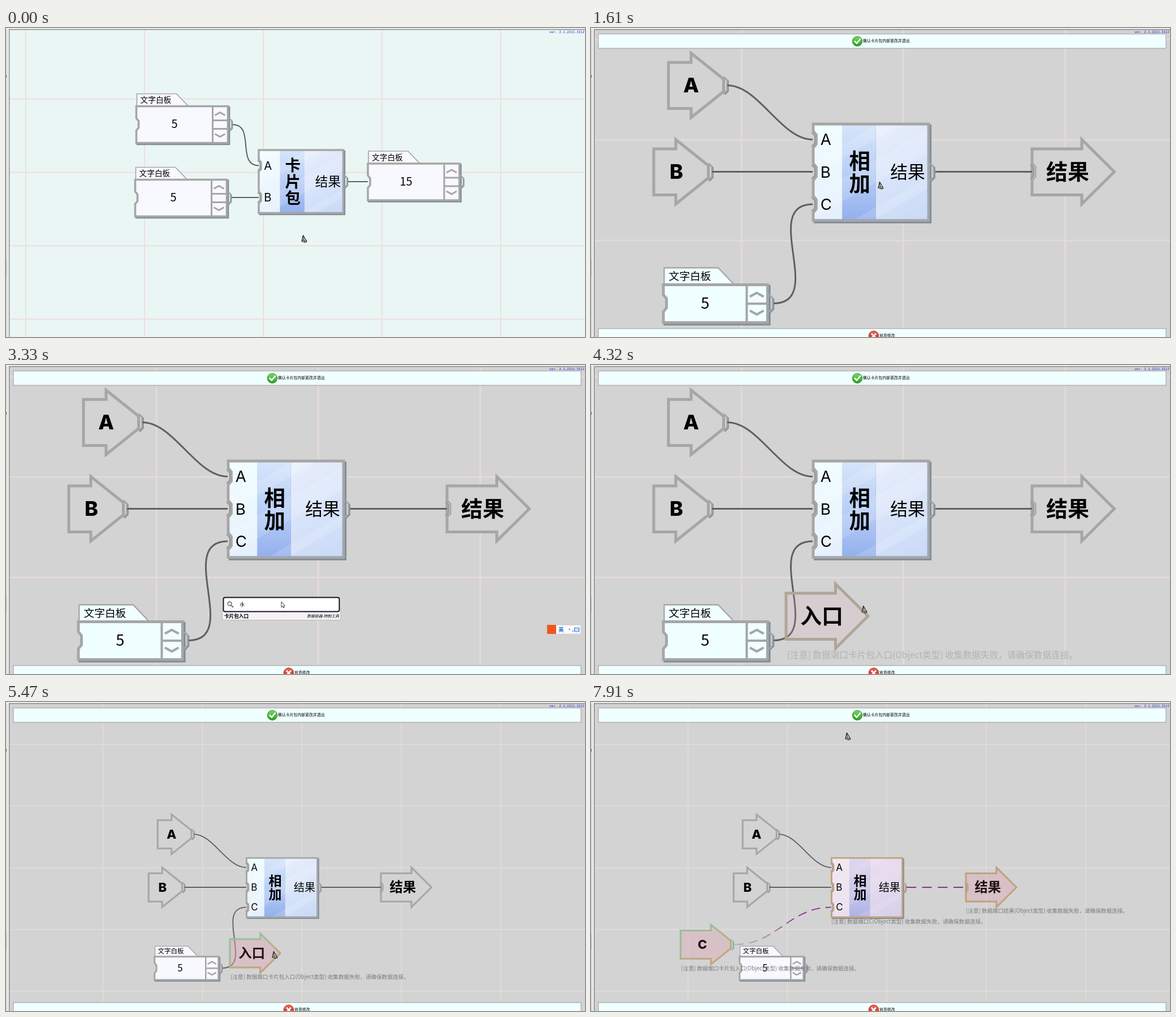
Animation of 1024x547 px, one loop 8 s. Source, as an HTML page with a canvas:

```html
<!DOCTYPE html>
<html lang="zh">
<head>
<meta charset="utf-8">
<title>卡片包</title>
<style>
html, body { margin: 0; width: 100%; height: 100%; overflow: hidden; background: #f0f0f0; }
canvas { display: block; }
</style>
</head>
<body>
<canvas id="stage" width="1024" height="547"></canvas>
<script>
const ctx = document.getElementById('stage').getContext('2d');
const LOOP = 8000;
const SANS = '"Noto Sans CJK SC", "Noto Sans CJK", "Noto Sans", sans-serif';
const LATIN = 'Inter, "Noto Sans CJK SC", sans-serif';
const MONO = '"DejaVu Sans Mono", "Noto Sans Mono", monospace';
const GREY = '#a6a6a6', SHADOW = '#7d8b99', WIRE = '#606060', PURPLE = '#8b3090';
const EDGE = [166, 166, 166], TAN = [192, 162, 126], GREEN = [140, 200, 170];
const UNIT = 1.365;               // size of cards inside the pack
const ZOOM = 0.614, PIVOT = [477, 445];

const lerp = (a, b, p) => a + (b - a) * p;
const clamp = v => Math.max(0, Math.min(1, v));
const mix = (a, b, p) => `rgb(${a.map((v, i) => Math.round(lerp(v, b[i], p)))})`;

// Number of changes seen so far, out of n spread evenly over start..end.
function steps(t, start, end, n) {
  if (t < start) return 0;
  return Math.min(n, Math.floor((t - start) / (end - start) * (n - 1) + 0.02) + 1);
}

function text(s, x, y, size, o = {}) {
  ctx.font = `${o.style || 'normal'} ${o.weight || 400} ${size}px ${o.font || SANS}`;
  ctx.textAlign = o.align || 'left';
  ctx.textBaseline = 'alphabetic';
  ctx.fillStyle = o.color || '#000';
  ctx.fillText(s, x, y + size * 0.37);
}

function poly(points, open) {
  ctx.beginPath();
  points.forEach(([x, y]) => ctx.lineTo(x, y));
  if (!open) ctx.closePath();
}

function paint(fill, stroke, width) {
  if (fill) { ctx.fillStyle = fill; ctx.fill(); }
  if (stroke) { ctx.strokeStyle = stroke; ctx.lineWidth = width; ctx.stroke(); }
}

function gradient(x0, y0, x1, y1, ...colors) {
  const g = ctx.createLinearGradient(x0, y0, x1, y1);
  colors.forEach((c, i) => g.addColorStop(i / (colors.length - 1), c));
  return g;
}

function local(x, y, k, draw) {
  ctx.save();
  ctx.translate(x, y);
  ctx.scale(k, k);
  draw();
  ctx.restore();
}

// Outline of a card with a notch in the left edge at each input.
function bodyPath(w, h, inputs) {
  const points = [[0, 0], [w, 0], [w, h], [0, h]];
  for (const y of [...inputs].reverse())
    points.push([0, y + 11], [4, y + 6], [4, y - 6], [0, y - 11]);
  poly(points);
}

function plug(x, y, color, width) {
  poly([[x, y - 11], [x + 4.5, y - 6.5], [x + 4.5, y + 6.5], [x, y + 11]], true);
  paint(null, color, width);
}

function socket(x, y) {
  poly([[x - 4, y - 9], [x, y - 5], [x, y + 5], [x - 4, y + 9]], true);
  paint(null, '#9b9b9b', 1.8);
}

function outPort(x, y, color = GREY) {
  plug(x + 1.4, y + 1, SHADOW, 1.6);
  plug(x, y, color, 2);
}

function chevron(x, y, dir) {
  poly([[x - 9, y + 3 * dir], [x, y - 2 * dir], [x + 9, y + 3 * dir]], true);
  paint(null, GREY, 3);
}

function board(x, y, w, h, k, value, fill, rows) {
  local(x, y, k, () => {
    const mid = h / 2 - 0.5, div = w - 27;
    poly([[1, 0], [1, -22], [71, -22], [92, 0]]);
    paint(fill, GREY, 1.7);
    text('文字白板', 7, -11.5, 13.7);
    ctx.save();
    ctx.translate(2, 2);
    bodyPath(w, h, [mid]);
    paint(SHADOW, SHADOW, 3.6);
    ctx.restore();
    outPort(w + 2, mid);
    bodyPath(w, h, [mid]);
    paint(fill, GREY, 3.6);
    poly([[div, 0], [div, h]], true);
    paint(null, GREY, 3);
    for (const row of rows) {
      poly([[div, row], [w, row]], true);
      paint(null, GREY, 3);
    }
    const edge = rows.length > 1 ? 13 : 12.5;
    chevron(w - 14, edge, 1);
    chevron(w - 14, h - edge, -1);
    text(value, div / 2, mid - 0.5, 20, { align: 'center' });
  });
}

function panels(h, [a, b, c, d]) {
  ctx.fillStyle = gradient(0, 0, 38, h, a, b);
  ctx.fillRect(0, 0, 38, h);
  ctx.fillStyle = gradient(81, 0, 150, h, c, d);
  ctx.fillRect(81, 0, 70, h);
}

function card(x, y, h, k, title, labels, inputs, { hover = 0, error = 0 }) {
  const w = 149.5;
  local(x, y, k, () => {
    const out = h / 2 - 0.3;
    const line = error ? mix(EDGE, TAN, error) : mix(EDGE, GREEN, hover);
    ctx.save();
    ctx.translate(2.2, 2.2);
    bodyPath(w, h, inputs);
    paint(SHADOW, SHADOW, 3);
    ctx.restore();
    outPort(w + 2, out, line);
    ctx.save();
    bodyPath(w, h, inputs);
    ctx.clip();
    panels(h, ['#f2feff', '#e4effd', '#e9effc', '#c8d9f7']);
    if (hover) {
      ctx.globalAlpha = hover;
      panels(h, ['#effbf8', '#c4ecd9', '#e0f5ec', '#b9e6d0']);
      ctx.globalAlpha = 1;
    }
    ctx.fillStyle = gradient(0, 0, 0, h, '#d6e5fb', '#b9cff6', '#93b0ee');
    ctx.fillRect(37.5, 0, 43.5, h);
    for (const [top, size] of [[48, 18], [92, 30], [154, 14]]) {
      poly([[0, top], [w, top - 85], [w, top - 85 + size], [0, top + size]]);
      paint('rgba(255,255,255,.14)');
    }
    if (error) {
      ctx.fillStyle = `rgba(240,185,205,${0.3 * error})`;
      ctx.fillRect(0, 0, w, h);
    }
    ctx.restore();
    bodyPath(w, h, inputs);
    paint(null, line, 3.5);
    inputs.forEach((py, i) => {
      socket(2, py);
      text(labels[i], 9.3, py - 0.2, 20.3, { font: LATIN });
    });
    text('结果', 145, out, 22.6, { align: 'right' });
    [...title].forEach((ch, i) =>
      text(ch, 60.3, out + (i - (title.length - 1) / 2) * 29, 27.5, { weight: 900, align: 'center' }));
  });
}

function arrow(x, y, body, label, o = {}) {
  const { error = 0 } = o;
  const neck = x + body, tip = neck + 57.5;
  const end = o.out ? [[tip, y - 11], [tip, y + 11]] : [[tip, y]];
  const line = o.active
    ? gradient(x, y - 50, x + 60, y + 50, '#8fc3a2', '#9fbb95', '#c3a47c')
    : mix(EDGE, TAN, error);
  ctx.lineJoin = 'miter';
  poly([[x, y - 40.5], [neck, y - 40.5], [neck, y - 57], ...end,
    [neck, y + 57], [neck, y + 41], [x, y + 41]]);
  paint(error ? `rgba(220,165,178,${0.4 * error})` : '#d3d3d3', line, 5);
  text(label, x + (o.textX || 40), y - 1, label.length > 1 ? 38 : 36, {
    weight: label.length > 1 ? 900 : 800,
    align: 'center',
    font: label.length > 1 ? SANS : LATIN,
    color: mix([0, 0, 0], [32, 18, 20], error)
  });
  if (o.out) local(tip, y, UNIT, () => outPort(0, 0, o.active ? '#8fcfae' : GREY));
  if (o.input) local(x, y, UNIT, () => { plug(0, 0, line, 2); socket(2, 0); });
}

function wire(x0, y0, x1, y1, d, style, width, dash = []) {
  ctx.beginPath();
  ctx.moveTo(x0, y0);
  ctx.bezierCurveTo(x0 + d, y0, x1 - d, y1, x1, y1);
  ctx.setLineDash(dash);
  paint(null, style, width);
  ctx.setLineDash([]);
}

function grid(x0, y0, dx, dy, color, width) {
  ctx.beginPath();
  for (let x = x0 % dx; x < 1024; x += dx) { ctx.moveTo(x, 0); ctx.lineTo(x, 547); }
  for (let y = y0 % dy; y < 547; y += dy) { ctx.moveTo(0, y); ctx.lineTo(1024, y); }
  paint(null, color, width);
}

function note(port, x, y, alpha) {
  ctx.globalAlpha = alpha;
  text(`[注意] 数据端口${port}(Object类型) 收集数据失败，请确保数据连接。`, x, y, 15.65,
    { weight: 300, color: '#7c7c7c' });
  ctx.globalAlpha = 1;
}

function outerView(t) {
  ctx.fillStyle = '#eaf6f3';
  ctx.fillRect(0, 0, 1024, 547);
  grid(35, 125.5, 210, 130, '#ecdfdf', 2);
  const hover = clamp((steps(t, 750, 1180, 4) - 1) / 3);
  const rows = [25, 40];
  board(230.5, 138.5, 162, 65, 1, '5', '#f8f8ff', rows);
  board(228.5, 268.5, 162, 65, 1, '5', '#f8f8ff', rows);
  board(640, 240, 162, 65, 1, '15', '#f8f8ff', rows);
  card(447, 216, 111.5, 1, '卡片包', ['A', 'B'], [27.5, 84], { hover });
  const far = mix([96, 96, 96], [140, 152, 146], hover);
  const near = mix([96, 96, 96], GREEN, hover);
  const width = lerp(2, 4, hover);
  wire(401, 171, 447, 243.5, 40, gradient(401, 0, 447, 0, far, near), width);
  wire(399, 300, 447, 300, 15, gradient(399, 0, 447, 0, far, near), width);
  wire(605, 272, 640, 272, 10, far, width);
}

function bar(y, x, color, label) {
  ctx.beginPath();
  ctx.rect(13, y, 1004, 25.5);
  paint('#f0ffff', '#b4b4b4', 1.5);
  ctx.beginPath();
  ctx.arc(x, y + 13, 8.7, 0, 7);
  paint(gradient(0, y + 4, 0, y + 22, ...color), color[1], 1);
  text(label, x + 10, y + 12.3, 6.9);
}

function bars() {
  bar(10.5, 471, ['#7fd86a', '#2a9a22'], '确认卡片包内部更改并退出');
  poly([[466, 23], [470, 27], [476.5, 19]], true);
  paint(null, '#fff', 2.6);
  bar(532, 500, ['#ee6a5a', '#c02a20'], '放弃修改');
  poly([[496, 541], [504, 549]], true);
  paint(null, '#fff', 2.6);
  poly([[504, 541], [496, 549]], true);
  paint(null, '#fff', 2.6);
}

function innerView(t) {
  const move = steps(t, 5170, 6190, 8);
  const scale = Math.pow(ZOOM, Math.min(move, 3) / 3);
  const drag = clamp((move - 3) / 5);
  const shown = steps(t, 4020, 5030, 8) / 8;
  const error = steps(t, 7220, 7910, 6) / 6;
  const linked = error > 0;
  const ox = PIVOT[0] * (1 - scale), oy = PIVOT[1] * (1 - scale);

  ctx.fillStyle = '#d3d3d3';
  ctx.fillRect(0, 0, 1024, 547);
  grid(266 * scale + ox, 198.3 * scale + oy, 286.3 * scale, 178 * scale, '#e5d9d9', Math.max(2, 3 * scale));

  local(ox, oy, scale, () => {
    const ex = lerp(345, -42, drag), ey = lerp(444.5, 419.5, drag);
    arrow(137, 101.5, 40, 'A', { out: true });
    arrow(111, 254.5, 39, 'B', { out: true });
    arrow(780, 254.5, 88, '结果', { input: true, error, textX: 63 });
    board(128, 454.5, 135, 49, UNIT, '5', move ? '#f8f8ff' : '#f0ffff', [24.5]);
    card(393, 170, 125, UNIT, '相加', ['A', 'B', 'C'], [20, 62, 104], { error });
    wire(241, 101.5, 392, 197.5, 56, WIRE, 3);
    wire(214, 254.5, 392, 254.5, 50, WIRE, 3);
    if (linked) {
      wire(609, 254.5, 780, 254.5, 50, PURPLE, 3, [28, 17]);
      const fade = gradient(ex + 156, 0, 392, 0, '#a9b5ad', '#9d8a9f', PURPLE, PURPLE);
      wire(ex + 156, ey, 392, 312, 122, fade, 3, [26, 15]);
    } else {
      wire(609, 254.5, 780, 254.5, 50, WIRE, 3);
      wire(323, 487.5, 392, 312, 93, WIRE, 3);
    }
    if (shown) {
      arrow(ex, ey, 87.5, linked ? 'C' : '入口', { error: shown, active: move > 0, out: linked, textX: 63 });
      note('卡片包入口', ex + 2, ey + 68.5, shown);
    }
    if (linked) {
      note('C', 392.5, 353.5, error);
      note('结果', 780, 322.5, error);
    }
  });
  const pull = steps(t, 6340, 6920, 5);
  if (pull > 1 && !linked) {
    const [x, y] = cursorAt(t);
    wire(250, 429.5, x, y, (x - 250) * 0.45, WIRE, 2);
  }
  bars();
  if (t >= 2630 && t < 4020) search(t);
}

const FOUND = ['卡片包入口', '日期', '容器', '如果', '任意值', '热键', '融合', '日志'];

function search(t) {
  const typed = steps(t, 3060, 3450, 4);
  const rows = typed === 0 ? 0 : typed === 1 ? FOUND.length : 1;
  if (rows) {
    ctx.beginPath();
    ctx.roundRect(382.5, 430, 209.5, 8 + rows * 13.7, 3);
    paint('#f5f1f7', '#b3b3b8', 1);
    for (let i = 0; i < rows; i++) {
      text(FOUND[i], 386, 444.5 + i * 13.7, 8.6, { weight: 700 });
      text(i ? '数据容器-工具' : '数据容器-特制工具', 589, 444.5 + i * 13.7, 6.8, { style: 'italic', align: 'right' });
    }
  }
  ctx.beginPath();
  ctx.roundRect(384.5, 411.5, 205, 25, 3);
  paint('#fff', '#15152a', 2);
  ctx.beginPath();
  ctx.arc(395.5, 422.5, 3.4, 0, 7);
  paint(null, '#707070', 1.6);
  poly([[398, 425], [402, 429]], true);
  paint(null, '#707070', 2.2);
  text(['', 'r', 'rk', 'rk', 'rk'][typed], 413.5, 424, 9, { color: '#333' });
  ctx.fillStyle = '#333';
  ctx.fillRect([414, 418, 422, 417, 422][typed], 419, 0.8, 10);

  // input method bar
  ctx.fillStyle = '#fff';
  ctx.fillRect(972, 461, 44, 14.5);
  ctx.fillStyle = '#f0561d';
  ctx.fillRect(957, 460, 16, 16);
  text('英', 977, 468.3, 9.5, { color: '#1d6fd0', weight: 700 });
  text('•,', 992, 467.5, 9, { color: '#1d6fd0', weight: 700 });
  ctx.beginPath();
  ctx.roundRect(1005.5, 465, 8, 7, 1);
  paint(null, '#1d6fd0', 1.2);
  ctx.beginPath();
  for (const y of [467.3, 469.7]) { ctx.moveTo(1007, y); ctx.lineTo(1012.5, y); }
  ctx.setLineDash([1, 1]);
  paint(null, '#1d6fd0', 1);
  ctx.setLineDash([]);
}

// [start, end, changes, changes before moving, x, y]
const MOVES = [
  [750, 1180, 4, 0, 512, 279],
  [1610, 2040, 4, 1, 488, 424],
  [4020, 5030, 8, 0, 475, 448],
  [5170, 6190, 8, 3, 237, 433],
  [6340, 6920, 5, 1, 424, 364],
  [7220, 7910, 6, 0, 454, 61]
];

function cursorAt(t) {
  let x = 527, y = 373.5;
  for (const [start, end, n, wait, tx, ty] of MOVES) {
    if (t < start) break;
    if (start === 6340) { x = 255; y = 433; }
    const p = clamp((steps(t, start, end, n) - wait) / (n - wait));
    x = lerp(x, tx, p);
    y = lerp(y, ty, p);
  }
  return [x, y];
}

function cursor(t) {
  const [x, y] = cursorAt(t);
  ctx.save();
  ctx.translate(x, y);
  if (t >= 2630 && t < 4020) {
    poly([[-1, -5], [-1, 5], [1.2, 3], [2.8, 6], [4.2, 5.3], [2.8, 2.4], [5.2, 2]]);
    paint('#fff', '#222', 0.9);
  } else {
    if (t >= 6340 && t < 7220) ctx.rotate(-1.3);
    ctx.lineJoin = 'round';
    poly([[-1.5, -6.5], [5, 4.5], [2, 6], [-4, 4]]);
    paint('#dfe5e2', '#202020', 1.2);
    poly([[-1.5, -6.5], [-0.5, 2.5], [2, 6]], true);
    paint(null, '#202020', 1);
    poly([[-4, 4], [-0.5, 1.5], [5, 4.5]], true);
    paint(null, '#202020', 0.9);
  }
  ctx.restore();
}

function chrome() {
  ctx.fillStyle = '#c0c0c0';
  ctx.fillRect(1, 3, 1, 544);
  ctx.fillStyle = '#777';
  ctx.fillRect(0, 83, 1, 5);
  ctx.fillStyle = '#d2d2d2';
  ctx.fillRect(0, 410, 1, 28);
  ctx.fillStyle = '#858585';
  ctx.fillRect(5, 2, 1019, 1.4);
  ctx.fillRect(5, 2, 1.4, 545);
  text('ver. 2.1.2211.3112', 1023, 7.2, 5.73, { font: MONO, color: '#1a1ae0', align: 'right' });
}

function draw(t) {
  ctx.fillStyle = '#f0f0f0';
  ctx.fillRect(0, 0, 1024, 547);
  ctx.save();
  ctx.beginPath();
  ctx.rect(6, 3, 1018, 544);
  ctx.clip();
  (t < 1610 ? outerView : innerView)(t);
  cursor(t);
  ctx.restore();
  chrome();
}

const begin = performance.now();
function tick() {
  draw((performance.now() - begin) % LOOP);
  requestAnimationFrame(tick);
}
tick();
</script>
</body>
</html>
```
